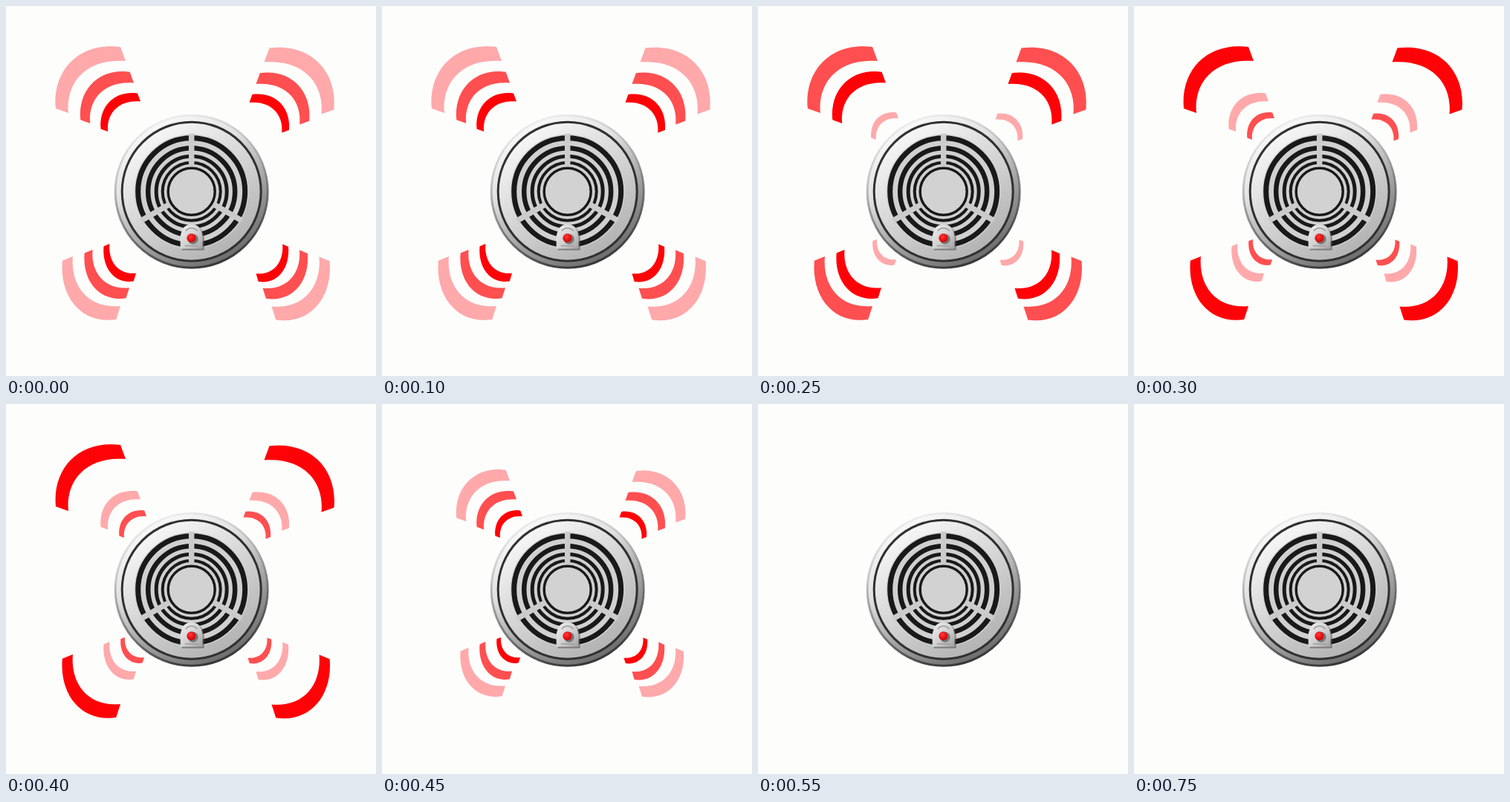
An HTML page that plays this animation: 498 px wide and 498 px high, repeating every 0.8 s.

```html
<!DOCTYPE html>
<html lang="en">
<head>
<meta charset="utf-8">
<title>Smoke alarm</title>
<style>
  :root { --full: #ff0208; --mid: #ff4f50; --soft: #ffa9ab; --off: transparent; }
  html, body { margin: 0; width: 100%; height: 100%; overflow: hidden; background: #fdfefc; }
  svg { display: block; width: 100%; height: 100%; }

  .wave { fill: var(--off); animation: 800ms step-end infinite; }
  .w0 { animation-name: w0; }
  .w1 { animation-name: w1; }
  .w2 { animation-name: w2; }
  .w3 { animation-name: w3; }

  /* Steps at 0, 150, 300, 450 and 550 ms; w0 is nearest the alarm. */
  @keyframes w0 {
    0% { fill: var(--off); } 18.75% { fill: var(--soft); } 37.5% { fill: var(--mid); }
    56.25% { fill: var(--full); } 68.75%, 100% { fill: var(--off); }
  }
  @keyframes w1 {
    0% { fill: var(--full); } 18.75% { fill: var(--off); } 37.5% { fill: var(--soft); }
    56.25% { fill: var(--mid); } 68.75%, 100% { fill: var(--off); }
  }
  @keyframes w2 {
    0% { fill: var(--mid); } 18.75% { fill: var(--full); } 37.5% { fill: var(--off); }
    56.25% { fill: var(--soft); } 68.75%, 100% { fill: var(--off); }
  }
  @keyframes w3 {
    0% { fill: var(--soft); } 18.75% { fill: var(--mid); } 37.5% { fill: var(--full); }
    56.25%, 100% { fill: var(--off); }
  }
</style>
</head>
<body>
<svg viewBox="0 0 498 498">
  <defs>
    <path id="arc" d="M88 1C34-6-4 31 1 84L18 90C14 51 40 16 95 20Z"/>
    <linearGradient id="rim" x1=".2" y1=".1" x2=".7" y2="1">
      <stop offset="0" stop-color="#f8f8f8"/>
      <stop offset=".3" stop-color="#e2e2e2"/>
      <stop offset=".65" stop-color="#a0a0a0"/>
      <stop offset="1" stop-color="#686868"/>
    </linearGradient>
    <linearGradient id="edge" x1=".3" y1="0" x2=".65" y2="1">
      <stop offset="0" stop-color="#f2f2f2"/>
      <stop offset=".3" stop-color="#c4c4c4"/>
      <stop offset=".6" stop-color="#808080"/>
      <stop offset="1" stop-color="#343434"/>
    </linearGradient>
    <linearGradient id="face" x1=".2" y1=".1" x2=".75" y2=".95">
      <stop offset="0" stop-color="#f6f6f6"/>
      <stop offset=".35" stop-color="#dedede"/>
      <stop offset=".7" stop-color="#c6c6c6"/>
      <stop offset="1" stop-color="#b2b2b2"/>
    </linearGradient>
    <linearGradient id="cap" x2="1" y2="1">
      <stop offset="0" stop-color="#f0f0f0"/>
      <stop offset=".55" stop-color="#d0d0d0"/>
      <stop offset="1" stop-color="#a0a0a0"/>
    </linearGradient>
    <radialGradient id="button" cx=".4" cy=".35" r=".7">
      <stop offset="0" stop-color="#ff4038"/>
      <stop offset=".5" stop-color="#ee1418"/>
      <stop offset="1" stop-color="#b80c10"/>
    </radialGradient>
  </defs>

  <g id="waves"></g>

  <g transform="translate(249.7 249.7)">
    <circle r="102.5" fill="url(#rim)" stroke="url(#edge)" stroke-width="3"/>
    <circle r="93.5" fill="url(#face)" stroke="#303030" stroke-width="3"/>
    <circle r="77" fill="#d0d0d0"/>
    <g fill="none" stroke="#191919">
      <circle r="72" stroke-width="7"/>
      <circle r="58.5" stroke-width="6.5"/>
      <circle r="47.5" stroke-width="5"/>
      <circle r="39" stroke-width="4"/>
      <circle r="31.5" stroke-width="3.5"/>
    </g>
    <g stroke="#cbcbcb" stroke-width="7.5">
      <path id="spoke" d="M0-34V-78"/>
      <use href="#spoke" transform="rotate(120)"/>
      <use href="#spoke" transform="rotate(240)"/>
    </g>
    <circle r="29.5" fill="#d2d2d2"/>
    <path d="M-13 79V60Q-12 46 2 46Q15 46 17 62V79Z" fill="#555" opacity=".6"/>
    <path d="M-15 77V61Q-13 44 0 44Q13 44 15 61V77Z" fill="url(#cap)"/>
    <path d="M-8 53Q0 45 8 53M-9 73H9" fill="none" stroke="#a0a0a0" stroke-width="1.5"/>
    <circle cx="2" cy="64" r="7" fill="#777"/>
    <circle cx="-.3" cy="62.5" r="6" fill="url(#button)"/>
  </g>
</svg>
<script>
  // Left-hand boxes, inner to outer: left, top, width, height.
  const upper = [[152, 143, 37, 37], [127, 117, 54, 52], [99.5, 88, 72.5, 70], [66, 54, 95, 90]];
  const lower = [[154, 314, 32, 35], [131, 320, 44, 51], [105, 328, 61, 66], [75, 337, 79, 86]];

  const arc = (i, x, y, sx, sy) =>
    `<use href="#arc" class="wave w${i}" transform="translate(${x} ${y}) scale(${sx} ${sy})"/>`;

  const pair = (boxes, down, mirror, drop) => boxes.map(([x, y, w, h], i) => {
    const sx = w / 95, sy = (down ? -h : h) / 90;
    const top = down ? y + h : y;
    return arc(i, x, top, sx, sy) + arc(i, mirror - x, top + drop, -sx, sy);
  }).join("");

  document.getElementById("waves").innerHTML =
    pair(upper, false, 508.5, 1.5) + pair(lower, true, 511.5, 0.5);
</script>
</body>
</html>
```
